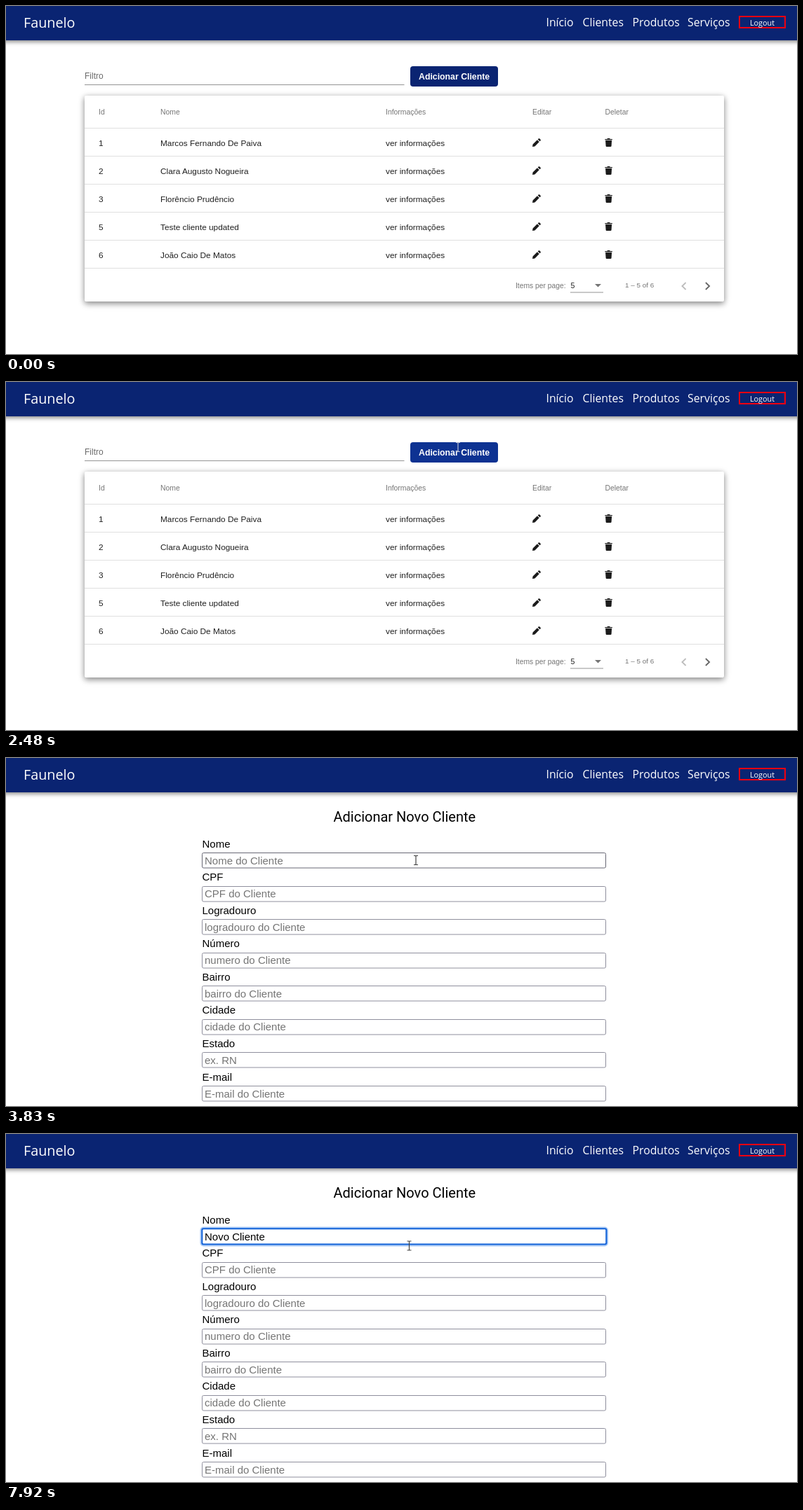
These frames come from a looping animation (1127 px wide and 497 px high, 7.99 s). An HTML page:

```html
<!DOCTYPE html>
<html lang="pt">
<head>
<meta charset="utf-8">
<title>Clientes</title>
<style>
html, body { margin: 0; width: 100%; height: 100%; overflow: hidden; background: #fff; }
svg { display: block; width: 1127px; height: 497px; }
text { white-space: pre; font-family: "Liberation Sans", Arial, sans-serif; }
.ui { font-family: "Open Sans", "Noto Sans", sans-serif; fill: #fff; }
.title { font-family: Roboto, sans-serif; }
.bar { filter: drop-shadow(0 2px 3px rgba(0,0,0,.5)); }
.card { filter: drop-shadow(0 3px 4px rgba(0,0,0,.38)) drop-shadow(0 1px 4px rgba(0,0,0,.14)); }
</style>
</head>
<body>
<svg id="stage" viewBox="0 0 1127 497"></svg>
<script>
const LOOP = 7990, NAVY = '#0a2472', NAVY_HOVER = '#0d3292';
const INK = '#212121', MUTED = '#757575';
const $ = id => document.getElementById(id);

const text = (x, y, size, str, fill = INK, extra = '') =>
  `<text x="${x}" y="${y}" font-size="${size}" fill="${fill}" ${extra}>${str}</text>`;
const rect = (x, y, w, h, attrs) =>
  `<rect x="${x}" y="${y}" width="${w}" height="${h}" ${attrs}/>`;
const path = (d, attrs = '') => `<path d="${d}" ${attrs}/>`;
const at = (x, y, body) => `<g transform="translate(${x} ${y})">${body}</g>`;

const PENCIL = 'M0 12L.6 8.5L6.9 2.2L9.8 5.1L3.5 11.4Z' +
  'M7.7 1.4L8.7 .4Q9.5 -.3 10.3 .4L11.6 1.7Q12.3 2.5 11.6 3.3L10.6 4.3Z';
const TRASH = 'M0 .9H3L3.6 0H6.8L7.4 .9H10.4V2.3H0Z' +
  'M.7 3H9.7L9.2 10.8Q9.1 12 8 12H2.4Q1.3 12 1.2 10.8Z';

function navBar() {
  const links = [[769.5, 'Início'], [821.5, 'Clientes'], [892.5, 'Produtos'], [971, 'Serviços']];
  return rect(-8, -8, 1143, 57, `fill="${NAVY}" class="bar"`) +
    text(25, 31, 19.8, 'Faunelo', '#fff', 'class="ui"') +
    links.map(([x, s]) => text(x, 29, 15.8, s, '#fff', 'class="ui"')).join('') +
    rect(1045, 15, 65, 16, 'fill="none" stroke="#f00010" stroke-width="2"') +
    text(1077.5, 27.5, 10.8, 'Logout', '#fff', 'class="ui" text-anchor="middle"');
}

function listPage() {
  const rows = [[1, 'Marcos Fernando De Paiva'], [2, 'Clara Augusto Nogueira'],
    [3, 'Florêncio Prudêncio'], [5, 'Teste cliente updated'], [6, 'João Caio De Matos']];
  const heads = [[132, 'Id'], [220, 'Nome'], [541, 'Informações'], [750, 'Editar'], [853.5, 'Deletar']];
  const row = ([id, name], i) => {
    const y = 195 + i * 40;
    return text(132, y + 4.5, 11.83, id) + text(220, y + 4.5, 11.83, name) +
      text(541, y + 4.5, 11.83, 'ver informações') +
      at(750, y - 6, path(PENCIL, 'fill="#1b1b1b"')) +
      at(853.4, y - 6, path(TRASH, 'fill="#1b1b1b"')) +
      rect(112, y + 19, 911, 1, 'fill="#e0e0e0"');
  };
  const chevron = (x, dir, color) =>
    path(`M${x - 2.6 * dir} 395L${x + 2.6 * dir} 400L${x - 2.6 * dir} 405`,
      `fill="none" stroke="${color}" stroke-width="1.8"`);
  return text(112, 104.3, 12, 'Filtro', '#6b6b6b') +
    rect(112, 112, 455.5, 1, 'fill="#949494"') +
    rect(576, 86, 125, 29, 'id="add" rx="4"') +
    text(588, 105, 12.3, 'Adicionar Cliente', '#fff', 'font-weight="bold"') +
    rect(112, 128, 911, 294, 'rx="2" fill="#fff" class="card"') +
    heads.map(([x, s]) => text(x, 155.3, 10.4, s, MUTED)).join('') +
    path('M608.5 156.5V149M605 152L608.5 148.8L612 152',
      'id="sort" fill="none" stroke="#757575" stroke-width="1.5" opacity=".2"') +
    rect(112, 174, 911, 1, 'fill="#e0e0e0"') + rows.map(row).join('') +
    text(726, 402.5, 10.3, 'Items per page:', MUTED) + text(804.5, 403, 10.6, '5') +
    path('M839 397H848L843.5 401.5Z', `fill="${MUTED}"`) +
    rect(804, 408.5, 47, 1, 'fill="#949494"') +
    text(882, 402, 9.9, '1 – 5 of 6', MUTED) +
    chevron(966, -1, '#bdbdbd') + chevron(999.5, 1, '#666');
}

function formPage() {
  const fields = [['Nome', 'Nome do Cliente'], ['CPF', 'CPF do Cliente'],
    ['Logradouro', 'logradouro do Cliente'], ['Número', 'numero do Cliente'],
    ['Bairro', 'bairro do Cliente'], ['Cidade', 'cidade do Cliente'],
    ['Estado', 'ex. RN'], ['E-mail', 'E-mail do Cliente']];
  const field = ([label, hint], i) => {
    const y = i * 47.55, top = Math.round(135 + y) + .5;
    return text(279.5, 127.7 + y, 15, label, '#000') +
      rect(279.5, top, 575, 21.5, `id="box${i}" rx="2" fill="#fff" stroke="#8f8f9d"`) +
      text(283, 151.7 + y, 15, hint, MUTED, `id="hint${i}"`);
  };
  const focus = rect(277.5, 133.5, 579.5, 26, 'rx="4" fill="none" stroke="#a9caf6" stroke-width="2"') +
    rect(279.3, 135.2, 576, 22.3, 'rx="2" fill="#fff" stroke="#0d5fd8" stroke-width="2"');
  return text(466.5, 91, 20, 'Adicionar Novo Cliente', '#000', 'class="title"') +
    `<g id="focus">${focus}</g>` + fields.map(field).join('') +
    text(283, 151.7, 15, '', '#000', 'id="typed"') +
    rect(283, 138, 1, 17, 'id="caret" fill="#000"');
}

const POINTERS = {
  arrow: path('M.5 .5V16.5L4.2 13L6.7 18.6L9 17.6L6.6 12.1H11.7Z', 'fill="#fff" stroke="#000"'),
  hand: path('M-1.5 1.5Q-1.5 0 0 0Q1.5 0 1.5 1.5V6.8Q3.8 6.2 4.3 7.5Q6.3 7 6.8 8.4Q8.8 8 9 10' +
    'V13Q9 15 7.8 16.5V19.3H0V17.5Q-2 15.5 -3 13Q-5.2 10.5 -5 9.6Q-3.8 8 -1.5 10.8Z',
    'fill="#fff" stroke="#000"'),
  beam: path('M-3 -6.5H-1Q0 -6.5 0 -5.5V5.5Q0 6.5 -1 6.5H-3M3 -6.5H1Q0 -6.5 0 -5.5M0 5.5Q0 6.5 1 6.5H3',
    'id="ibeam" fill="none" stroke-width="1.2"')
};

// time, x, y, pointer
const MOVES = [
  [1210, 1088, 480, 'arrow'], [1280, 1030, 425, 'arrow'], [1350, 950, 358, 'arrow'],
  [1420, 868, 290, 'arrow'], [1490, 795, 228, 'arrow'], [1560, 738, 180, 'arrow'],
  [1610, 700, 143, 'hand'], [1680, 647, 97, 'hand'], [1750, 645, 94, 'hand'],
  [1880, 644, 93, 'hand'], [2480, 644, 93, 'beam'], [2900, 641, 96, 'beam'],
  [2970, 634, 104, 'arrow'], [3040, 625, 113, 'arrow'], [3110, 615, 122, 'arrow'],
  [3180, 606, 129, 'arrow'], [3250, 599, 135, 'beam'], [3310, 594, 139, 'beam'],
  [3370, 591, 142, 'beam'], [3760, 586, 144, 'beam'], [3830, 584, 146, 'beam'],
  [7920, 574.5, 159.5, 'beam']
];
const TYPED = 'Novo Cliente';
const KEYS = [4950, 5150, 6160, 6230, 6510, 6710, 6780, 6980, 7050, 7120, 7250, 7320];
const FOCUS = 4090, BLINK = 530;

$('stage').innerHTML = `<rect width="1127" height="497" fill="#fff"/>
  <g id="list">${listPage()}</g><g id="form">${formPage()}</g>${navBar()}
  <circle id="click" r="10" fill="#ff0" fill-opacity=".47"/>
  <g id="mouse">${Object.keys(POINTERS).map(k => `<g id="${k}">${POINTERS[k]}</g>`).join('')}</g>`;

const show = (id, on) => $(id).setAttribute('visibility', on ? 'inherit' : 'hidden');
const within = (t, a, b) => t >= a && t < b;

function drawMouse(t) {
  const move = MOVES.filter(m => m[0] <= t).pop();
  show('mouse', move);
  show('click', within(t, 2140, 2350) || within(t, FOCUS, 4290));
  if (!move) return;
  const [, x, y, kind] = move;
  $('mouse').setAttribute('transform', `translate(${x} ${y})`);
  $('click').setAttribute('cx', x - 2.5);
  $('click').setAttribute('cy', y - 1);
  for (const k in POINTERS) show(k, k === kind);
  $('ibeam').setAttribute('stroke', t < 2550 ? '#b9bfd2' : '#444');
}

function drawInput(t) {
  const count = KEYS.filter(k => k <= t).length;
  const focused = t >= FOCUS;
  const since = t - (count ? KEYS[count - 1] : FOCUS);
  $('typed').textContent = TYPED.slice(0, count);
  $('caret').setAttribute('x', Math.round(283 + (count ? $('typed').getComputedTextLength() : 0)));
  show('caret', focused && Math.floor(since / BLINK) % 2 === 0);
  show('hint0', !count);
  show('focus', focused);
  show('box0', !focused);
  $('box0').setAttribute('stroke', t >= 3760 ? '#676774' : '#8f8f9d');
}

function render(t) {
  const form = t >= 2550;
  $('list').style.display = form ? 'none' : '';
  $('form').style.display = form ? '' : 'none';
  $('add').setAttribute('fill', t >= 1750 ? NAVY_HOVER : NAVY);
  show('sort', within(t, 1610, 1750));
  if (form) drawInput(t);
  drawMouse(t);
}

const start = performance.now();
function tick() {
  render((performance.now() - start) % LOOP);
  requestAnimationFrame(tick);
}
tick();
</script>
</body>
</html>
```
